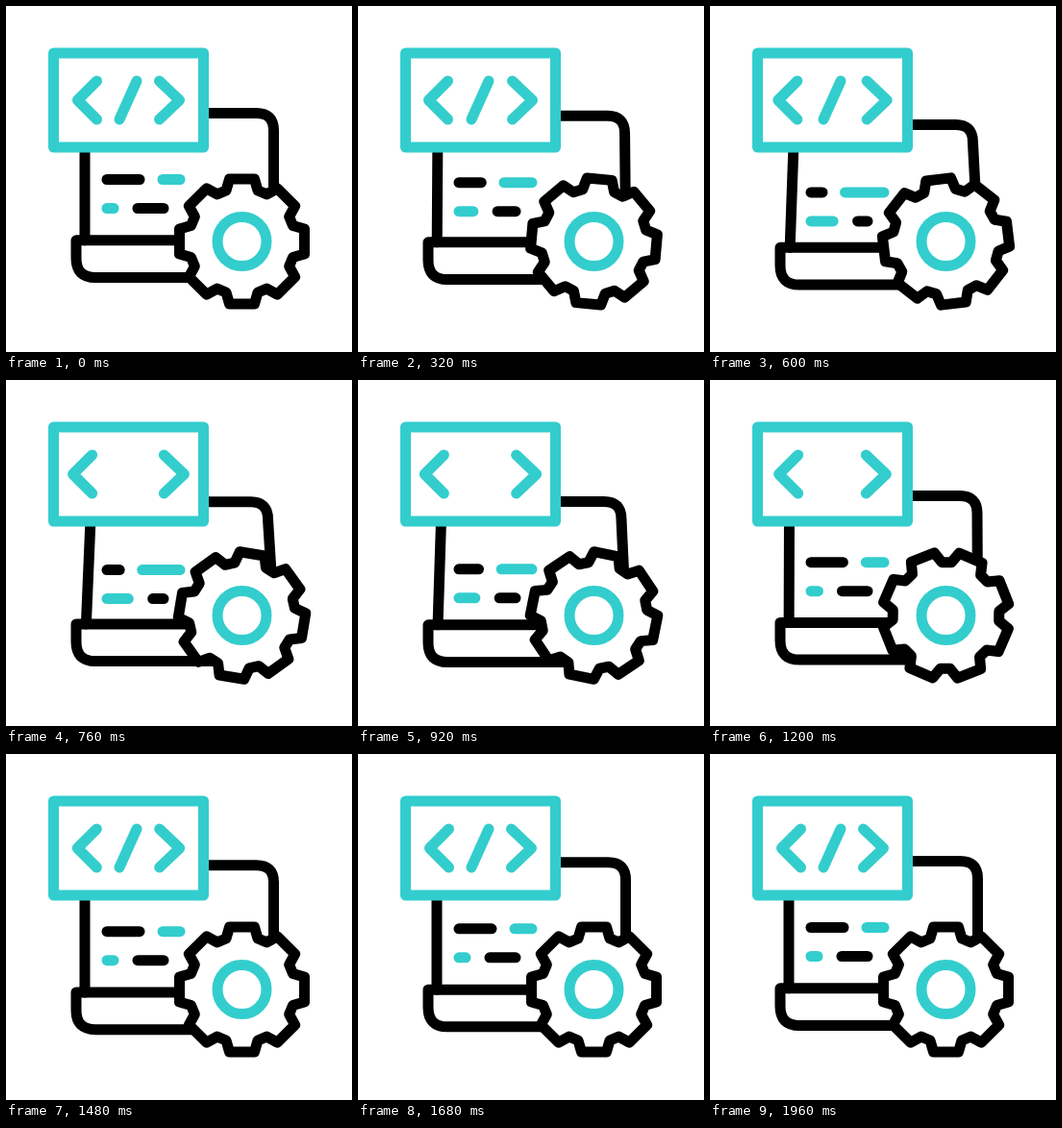
Animation of 360x360 px, one loop 2 s. Source, as an HTML page:

```html
<!DOCTYPE html>
<html lang="en">
<head>
<meta charset="utf-8">
<title>Development icon</title>
<style>
  html, body { margin: 0; width: 100%; height: 100%; overflow: hidden; background: #fff; }
  svg { display: block; width: 100%; height: 100%; }
  path, rect, circle { fill: none; stroke: #000; stroke-width: 11; stroke-linecap: round; stroke-linejoin: round; }
  .accent { stroke: #33cdcd; }
  .solid { fill: #fff; }
</style>
</head>
<body>
<svg viewBox="0 0 360 360">
  <path id="screen"/>
  <path id="row1Dark"/>
  <path id="row1Accent" class="accent"/>
  <path id="row2Accent" class="accent"/>
  <path id="row2Dark"/>
  <path id="base" d="M200 243.8H73V262.5Q73 282.5 93 282.5H225"/>
  <rect class="accent solid" x="49.5" y="49" width="156" height="98"/>
  <path id="left" class="accent" d="M94.5 78L74.5 98L94.5 118"/>
  <path id="slash" class="accent" d="M136 78L118 118"/>
  <path id="right" class="accent" d="M159.5 78L180.5 98L159.5 118"/>
  <g transform="translate(245.5 245)">
    <path id="gear" class="solid"/>
    <circle class="accent" r="25.5"/>
  </g>
</svg>
<script>
const LOOP = 2000, STEP = 40;
const el = id => document.getElementById(id);
const set = (id, name, value) => el(id).setAttribute(name, value);

const ease = x => {
  const c = Math.min(1, Math.max(0, x));
  return c * c * (3 - 2 * c);
};
// Rises from 0 to 1 between start and peak, then falls back by end.
const swing = (t, start, peak, end) =>
  t < peak ? ease((t - start) / (peak - start)) : 1 - ease((t - peak) / (end - peak));

function gearPath(teeth) {
  const profile = [[-17.3, 55.5], [-11.3, 66.3], [11.3, 66.3], [17.3, 55.5]];
  const points = [];
  for (let i = 0; i < teeth; i++) {
    for (const [offset, r] of profile) {
      const a = (i * 360 / teeth + offset) * Math.PI / 180;
      points.push((r * Math.sin(a)).toFixed(2) + ' ' + (-r * Math.cos(a)).toFixed(2));
    }
  }
  return 'M' + points.join('L') + 'Z';
}

const line = (id, x1, x2, y) => set(id, 'd', `M${x1} ${y}H${x2}`);

function draw(t) {
  const drop = 11 * swing(t, 100, 900, 1900);
  const tilt = swing(t, 180, 740, 1300);
  const swap = swing(t, 0, 660, 1260);
  const spread = 5.2 * swing(t, 100, 880, 1560);
  const turn = 58 * swing(t, 200, 860, 1460);

  const top = 111.5 + drop + 5.2 * tilt;
  const l = 82 + 6.8 * tilt, r = 278.5 - 6 * tilt;
  set('screen', 'd', `M${82 + 1.4 * tilt} ${243.8 + drop}L${l} ${top}H${r - 18}` +
    `Q${r} ${top} ${r} ${top + 18}L278.5 ${230 + drop}`);

  const y = 180.5 + drop + 7 * tilt;
  line('row1Dark', 105, 139 - 22.5 * swap, y);
  line('row1Accent', 163 - 23 * swap, 181, y);
  line('row2Accent', 105, 112 + 16.5 * swap, y + 30);
  line('row2Dark', 137 + 17 * swap, 164, y + 30);

  set('base', 'transform', `translate(0 ${drop})`);
  set('left', 'transform', `translate(${-spread} 0)`);
  set('right', 'transform', `translate(${spread} 0)`);
  set('slash', 'visibility', t >= 760 && t < 1340 ? 'hidden' : 'visible');
  set('gear', 'transform', `rotate(${turn})`);
}

set('gear', 'd', gearPath(8));
const begin = performance.now();
function tick() {
  const t = (performance.now() - begin) % LOOP;
  draw(Math.floor(t / STEP) * STEP);
  requestAnimationFrame(tick);
}
tick();
</script>
</body>
</html>
```
